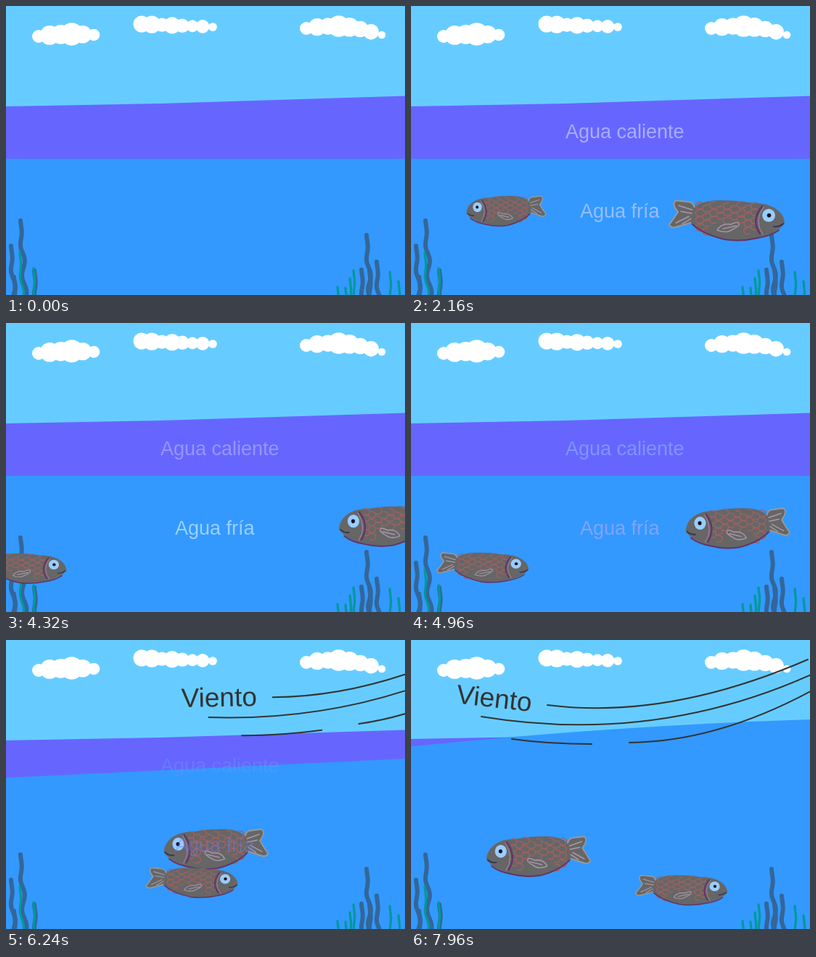
Write an HTML page with a canvas that moves like this. It is 550 px wide and 400 px high and loops after 8 s.

```html
<!DOCTYPE html>
<html lang="es">
<head>
<meta charset="utf-8">
<title>Agua caliente, agua fría y viento</title>
<style>
html, body { margin: 0; width: 100%; height: 100%; overflow: hidden; }
canvas { display: block; }
</style>
</head>
<body>
<canvas id="stage" width="550" height="400"></canvas>
<script>
const c = document.getElementById('stage').getContext('2d');
const LOOP = 8000, STEP = 40;
const HOT = '#6666ff', COLD = '#3399ff', SKY = '#66ccff', LIGHT = [198, 208, 255];
const FONT = '"Liberation Sans", Arial, sans-serif';
c.lineCap = c.lineJoin = 'round';

const shape = d => new Path2D(d);
const mix = (a, b, u) => a + (b - a) * u;
const part = (t, from, to) => Math.min(1, Math.max(0, (t - from) / (to - from)));

function draw(path, fill, stroke, width = 1) {
  if (fill) { c.fillStyle = fill; c.fill(path); }
  if (stroke) { c.strokeStyle = stroke; c.lineWidth = width; c.stroke(path); }
}

function dot(x, y, r, color) {
  c.fillStyle = color;
  c.beginPath();
  c.arc(x, y, r, 0, 7);
  c.fill();
}

// ---- Scenery ----
// A row of puffs between two ends, swelling and rising in the middle
function cloud(x0, y0, r0, x1, y1, r1, swell, rise) {
  const n = Math.round((x1 - x0) / 15);
  for (let i = 0; i <= n; i++) {
    const u = i / n, mid = Math.sin(Math.PI * u);
    const r = mix(r0, r1, u) + swell * mid + 1.3 * Math.sin(i * 2.4);
    dot(mix(x0, x1, u), mix(y0, y1, u) - rise * mid, r, '#fff');
  }
}

// A wavy strand from its tip down to the sea floor
function strand(x, top, width, sway, color) {
  const p = new Path2D();
  for (let y = top; y <= 404; y += 2) {
    const d = y - top;
    p.lineTo(x + 0.06 * d + sway * Math.sin(d / 7) * Math.min(1, d / 40), y);
  }
  draw(p, null, color, width);
}

const darkWeeds = [[20, 297], [7, 332], [11, 375], [39, 366], [497, 317], [490, 365], [511, 354], [501, 366]];
const greenWeeds = [[19, 341], [38, 363], [457, 389], [479, 366], [474, 377], [468, 390], [529, 368], [541, 381]];

function scenery() {
  cloud(45, 42, 9, 121, 40, 9, 6, 2);
  cloud(187, 25, 11.5, 285, 29, 7, 1, 0);
  cloud(414, 31, 9, 518, 40, 6.5, 6, 7);
}

function weeds() {
  darkWeeds.forEach(([x, top]) => strand(x, top, 6, 2.5, '#336699'));
  greenWeeds.forEach(([x, top]) => strand(x, top, 3.2, 2, '#009999'));
}

function water(t) {
  const a = part(t, 5320, 7160), b = part(t, 7160, 7960);
  const left = 211.5 - 41.5 * a - 22.5 * b;
  const right = 211.5 - 94.5 * a - 7 * b;
  const surface = 139 - 2 * b;
  draw(shape(`M0 ${surface}L213 ${surface - 4} 550 124.5V400H0Z`), HOT);
  draw(shape(`M0 ${left}Q275 ${(left + right) / 2 - 10 * b} 550 ${right}V400H0Z`), COLD);
}

// ---- Fish, drawn in a 160 x 57 box, facing right ----
const body = shape('M33 15Q38 3 62 1Q90 0 112 4Q138 4 150 14Q160 22 160 33Q150 46 125 52Q100 58 78 55Q45 48 31 33Z');
const belly = shape('M33 34Q48 48 78 55Q101 58 122 53Q141 50 152 42');
const tail = shape('M37 15Q35 4 29 3L11 1Q5 3 9 11L13 17Q7 26 1 34Q2 39 9 38L33 31Z');
const rays = shape('M14 8L33 14M17 16L33 19M10 32L28 23M19 33L31 26');
const fin = shape('M67 42Q72 32 86 34Q98 28 97 35Q93 39 88 41Q80 47 67 42ZM75 40L93 36');
const gill = shape('M129 9Q113 28 126 47');
const gillEdge = shape('M131 10Q117 30 130 48');
const mouth = shape('M145 37Q152 38 158 33');
const scales = new Path2D();
for (let col = 0; col < 9; col++) {
  for (let row = 0; row < 5; row++) {
    const x = 40 + col * 9.5, y = 8 + row * 10 + (col % 2) * 5 + Math.sin(col * 5 + row * 3);
    const onFin = y > 30 && x > 58 && x < 102;
    if (Math.abs(y - 25) > 21 || onFin) continue;
    scales.moveTo(x + 5, y - 5);
    scales.quadraticCurveTo(x - 5, y - 4, x - 2, y + 2);
    scales.quadraticCurveTo(x, y + 6, x + 6, y + 4);
  }
}

function fish(x, y, w, h, flip) {
  c.save();
  c.translate(flip ? x + w : x, y);
  c.scale((flip ? -w : w) / 160, h / 57);
  draw(tail, '#666', '#999', 2);
  draw(rays, null, '#a99aa9', 1.5);
  draw(body, '#666');
  draw(scales, null, '#a06060', 1.5);
  draw(belly, null, '#663366', 2);
  draw(gill, null, '#663366', 2.5);
  draw(gillEdge, null, '#a98aaf', 1);
  draw(fin, '#666', '#a594a5', 1.6);
  draw(mouth, null, '#333355', 1.8);
  dot(138, 21.5, 9, '#99ccff');
  dot(138.5, 21.5, 2.8, '#111122');
  c.restore();
}

function swim(t) {
  if (t < 3400) {
    const n = (t - 1280) / STEP;
    fish(281 - 9.3 * n, 260 + 0.1 * n, 110, 43, true);
    fish(141 + 9.73 * n, 285 - 0.76 * n, 160, 57, false);
  } else {
    // Steady crossing, then a slow sink
    const n = Math.min(0, (t - 7160) / STEP), sink = part(t, 7160, 7960);
    fish(102 - 5.03 * n + 2 * sink, 264.8 + 0.168 * n + 6.2 * sink, 144, 57, true);
    fish(305.7 + 4.92 * n + 3.3 * sink, 312.8 - 0.08 * n + 12.2 * sink, 127, 42.5, false);
  }
}

// ---- Captions: fade in, change tint, fade out ----
function caption(text, x, y, t, mid, late) {
  const a = part(t, 3400, 4320), b = part(t, 4320, 5520);
  const rgb = LIGHT.map((v, i) => mix(mix(v, mid[i], a), late[i], b));
  c.globalAlpha = part(t, 40, 3160) * (1 - part(t, 5520, 6760));
  c.font = '27px ' + FONT;
  c.fillStyle = `rgb(${rgb})`;
  c.fillText(text, x, y);
  c.globalAlpha = 1;
}

// ---- Wind, relative to the start of its middle stroke ----
const gusts = shape('M91 -16Q257 5 450 -79M0 0Q243 40 463 -62M42 31Q92 38 152 38M204 36Q328 35 463 -40');

function wind(t) {
  if (t < 5000) return;
  const u = Math.min(1, (t - 5520) / 2040);
  c.save();
  c.translate(379 - 282 * u, 106 + 4.4 * u * (1 - u));
  c.rotate(-11.6 * (1 - u) * Math.PI / 180);
  draw(gusts, null, '#333', 2);
  c.translate(-35.5, -18.8);
  c.rotate(6.5 * Math.PI / 180);
  c.font = '37px ' + FONT;
  c.fillStyle = '#333';
  c.fillText('Viento', 0, 0);
  c.restore();
}

function frame(now) {
  const t = Math.floor(now % LOOP / STEP) * STEP;
  c.fillStyle = SKY;
  c.fillRect(0, 0, 550, 400);
  scenery();
  water(t);
  weeds();
  swim(t);
  caption('Agua caliente', 213, 183, t, [150, 150, 255], [107, 148, 255]);
  caption('Agua fría', 233, 293, t, [155, 208, 255], [107, 126, 245]);
  wind(t);
  requestAnimationFrame(frame);
}
requestAnimationFrame(frame);
</script>
</body>
</html>
```
